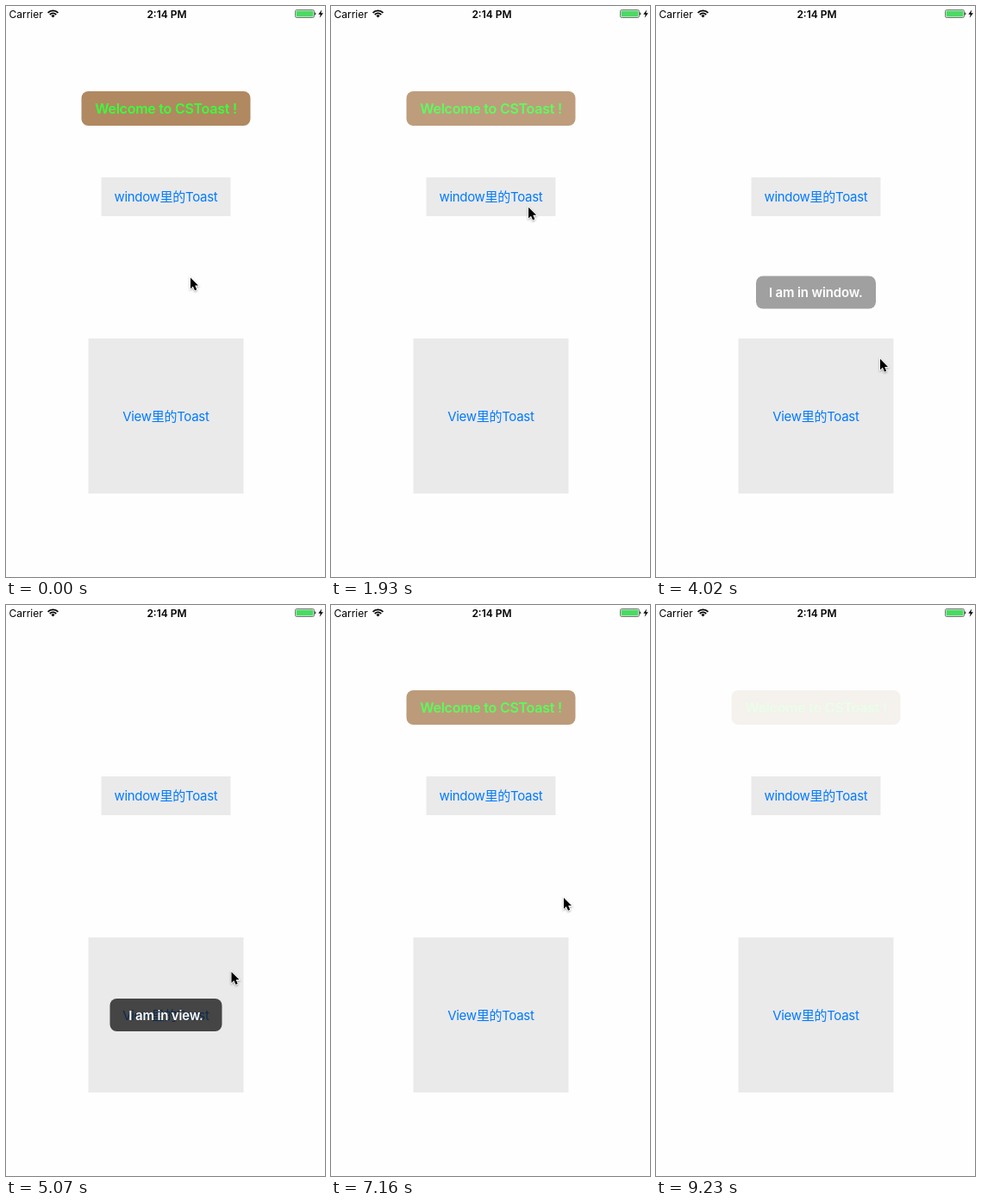
An HTML page that plays this animation: 370x663 px, repeating every 9.53 s.

```html
<!DOCTYPE html>
<html lang="en">
<head>
<meta charset="utf-8">
<title>Toast demo</title>
<style>
  html, body { margin: 0; width: 100%; height: 100%; overflow: hidden; background: #fefefe; }
  svg { display: block; width: 370px; height: 663px; }
  text { font-family: Inter, "Noto Sans CJK SC", "Noto Sans CJK", sans-serif; }
  .btn text { font-size: 15px; letter-spacing: -.3px; fill: #007aff; text-anchor: middle; }
  .btn rect { fill: #eaeaea; }
  .toast text { font-size: 15px; font-weight: 600; letter-spacing: -.15px; fill: #fff; text-anchor: middle; }
  .toast rect { fill: #000; fill-opacity: .7; }
  #welcome rect { fill: #963; fill-opacity: 1; }
  #welcome text { font-size: 16px; letter-spacing: -.24px; fill: #0f0; }
  .status { font-size: 12px; }
</style>
</head>
<body>
<svg viewBox="0 0 370 663">
  <rect width="370" height="663" fill="#fefefe"/>

  <g class="status">
    <text x="3.5" y="13.5">Carrier</text>
    <text x="186.5" y="13.5" font-weight="600" text-anchor="middle">2:14 PM</text>
    <g fill="none" stroke="#000" stroke-width="1.8">
      <path d="M48.6 7.8a8.2 8.2 0 0 1 11.8 0"/>
      <path d="M50.8 10a5.2 5.2 0 0 1 7.4 0"/>
    </g>
    <path d="M52.4 11.3a3 3 0 0 1 4.2 0L54.5 13.5Z"/>
    <rect x="335.5" y="4.5" width="22" height="9" rx="1.8" fill="none" stroke="#555" stroke-width=".8"/>
    <rect x="336.5" y="5.5" width="20" height="7" rx=".8" fill="#4cd964"/>
    <path d="M358.3 7.2a2 2 0 0 1 0 3.6Z"/>
    <path d="M366.3 4.3L362.3 9.7H364.8L363.7 13.7L367.9 8.2H365.3Z"/>
  </g>

  <g class="btn">
    <rect x="110.5" y="199" width="150" height="45"/>
    <text id="winLabel" x="185.4" y="227">window里的Toast</text>
    <rect x="95.5" y="386" width="180" height="180"/>
    <text id="viewLabel" x="185.4" y="481.5">View里的Toast</text>
  </g>

  <g class="toast" id="welcome">
    <rect x="87.5" y="99" width="196" height="40" rx="8"/>
    <text x="185.5" y="124.5">Welcome to CSToast !</text>
  </g>
  <g class="toast" id="winToast">
    <rect x="116" y="313.5" width="139" height="38" rx="8"/>
    <text x="185.3" y="338">I am in window.</text>
  </g>
  <g class="toast" id="viewToast">
    <rect x="120.5" y="457" width="130" height="38" rx="8"/>
    <text x="185.5" y="481.5">I am in view.</text>
  </g>

  <g id="cursor">
    <circle id="ring" cx="1.5" cy=".5" r="10" fill="none" stroke="#000"/>
    <path d="M.5 .5V13.2L3.4 10.5L5.5 15.3L7.7 14.3L5.7 9.6H9.5Z" stroke="#fff" stroke-width="1.6"
      paint-order="stroke" style="filter:drop-shadow(0 1px 1px rgba(0,0,0,.35))"/>
  </g>
</svg>
<script>
  const LOOP = 9530, TICK = 149, LAST = 62;
  const FADE = 220, RELEASE = 250;
  const WIN_TAP = 17 * TICK, VIEW_TAP = 33 * TICK;

  // Cursor moves: start, end, x, y; each eases out from where the last one stopped.
  const HOME = [213.5, 315];
  const MOVES = [
    [970, 1340, 219, 359],
    [1340, 2086, 229, 228],
    [3278, 3576, 253, 339],
    [3725, 4250, 261, 425.5],
    [5811, 6407, 265, 349.5],
    [6407, 6705, 269.5, 339.5],
    [7897, 8493, 470, 660]
  ];

  const $ = id => document.getElementById(id);
  const clamp = v => Math.min(1, Math.max(0, v));
  const easeOut = u => 1 - (1 - u) ** 2;
  const setOpacity = (id, v) => $(id).setAttribute('opacity', v);

  // Fades in at start, out again at the end of its life.
  const toast = (t, start, life) => clamp(Math.min(t - start, start + life - t) / FADE);
  const label = (t, tap) => t < tap ? 1 : 1 - .4 * clamp(1 - (t - tap) / RELEASE);
  const tapped = (t, tap) => t >= tap && t < tap + TICK;

  function cursorAt(t) {
    let [x, y] = HOME;
    for (const [start, end, toX, toY] of MOVES) {
      const k = easeOut(clamp((t - start) / (end - start)));
      x += (toX - x) * k;
      y += (toY - y) * k;
    }
    return [x, y];
  }

  function draw(now) {
    const t = TICK * Math.min(LAST, Math.floor((now % LOOP + 10) / TICK));
    setOpacity('welcome', Math.max(toast(t, -169, 2245), toast(t, 7010, 2245)));
    setOpacity('winToast', toast(t, 2388, 1750));
    setOpacity('viewToast', toast(t, 4790, 1750));
    setOpacity('winLabel', label(t, WIN_TAP));
    setOpacity('viewLabel', label(t, VIEW_TAP));
    setOpacity('ring', tapped(t, WIN_TAP) || tapped(t, VIEW_TAP) ? 1 : 0);
    $('cursor').setAttribute('transform', `translate(${cursorAt(t)})`);
    requestAnimationFrame(draw);
  }
  draw(0);
</script>
</body>
</html>
```
